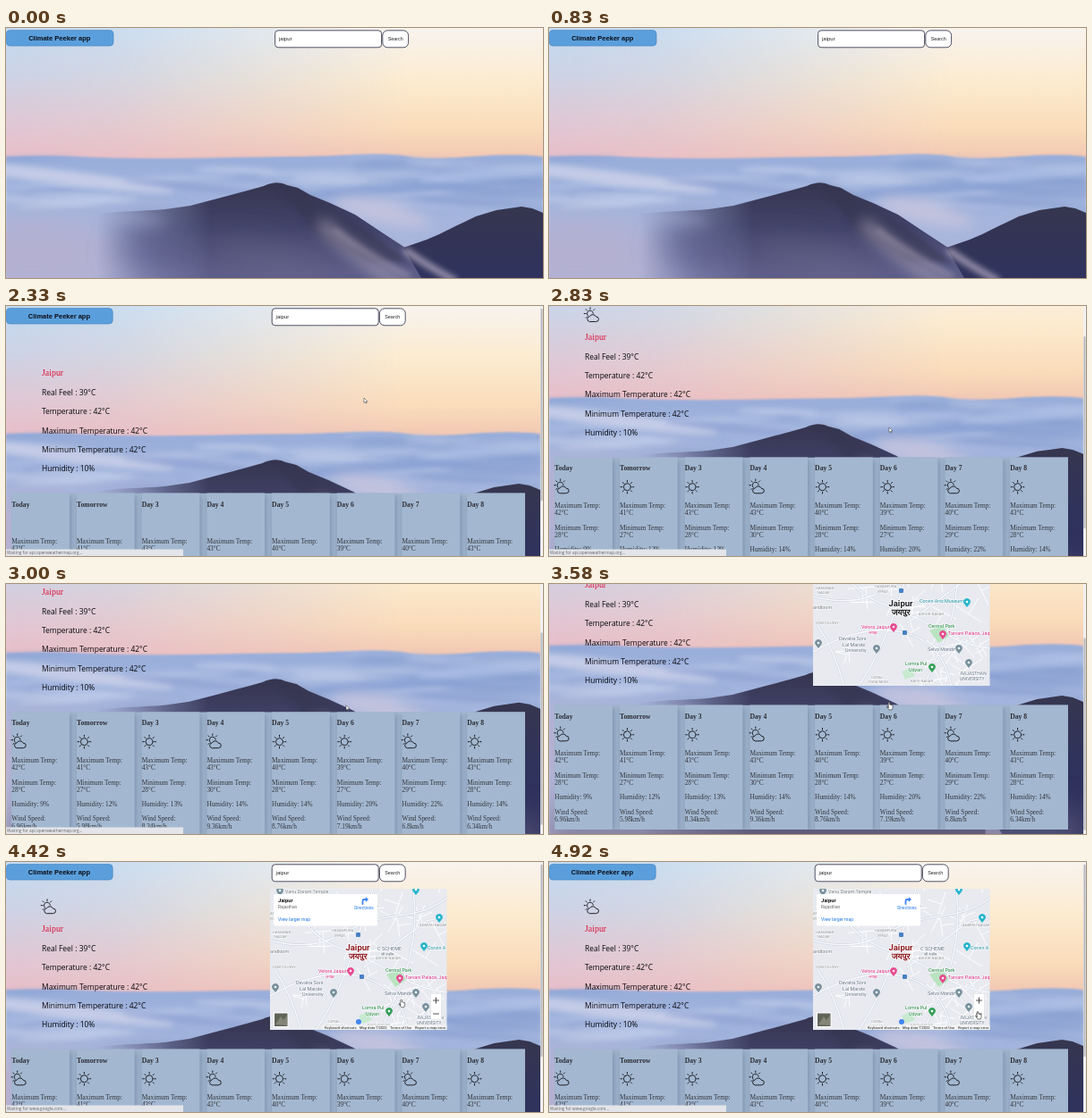
Recreate the animation shown at these times as an HTML page. Size 600 by 280 pixels, loop 5010 ms.

```html
<!DOCTYPE html>
<html lang="en">
<head>
<meta charset="utf-8">
<style>
html, body { margin: 0; width: 100%; height: 100%; overflow: hidden; background: #c8d8ea }
svg { display: block; width: 600px; height: 280px }
.arial { font-family: "Liberation Sans", sans-serif }
.serif { font-family: "Liberation Serif", serif }
.open { font-family: "Open Sans", sans-serif }
.map { font-family: Roboto, sans-serif }
.hover .button { fill: #4682b4 }
.hover .caption { fill: #fff }
</style>
</head>
<body>
<svg id="stage" viewBox="0 0 600 280"></svg>
<script>
const LOOP = 5010, STEP = 250 / 3;
const LOADED = 2080, ICONS = 2500, MAP = 3160, DETAILS = 4400;

let seed = 7;
const rnd = (a, b) => a + (b - a) * ((seed = seed * 16807 % 2147483647) / 2147483647);
const times = (n, fn) => Array.from({ length: n }, (_, i) => fn(i)).join('');
const rect = (x, y, w, h, fill, more = '') =>
  `<rect x="${x}" y="${y}" width="${w}" height="${h}" fill="${fill}" ${more}/>`;
const path = (d, fill, more = '') => `<path d="${d}" fill="${fill}" ${more}/>`;
const line = (d, color, width, more = '') =>
  path(d, 'none', `stroke="${color}" stroke-width="${width}" stroke-linecap="round" ${more}`);
const blob = (x, y, rx, ry, fill, opacity, blur, turn = 0) =>
  `<ellipse cx="${x}" cy="${y}" rx="${rx}" ry="${ry}" fill="${fill}" opacity="${opacity}"
   filter="url(#blur${blur})" transform="rotate(${turn} ${x} ${y})"/>`;
const text = (x, y, s, size, font, fill = '#222', more = '') =>
  `<text x="${x}" y="${y}" font-size="${size}" class="${font}" fill="${fill}" ${more}>${s}</text>`;
const group = (id, body, more = '') => `<g id="${id}" ${more}>${body}</g>`;
const gradient = (id, vertical, ...stops) =>
  `<linearGradient id="${id}" x2="${vertical ? 0 : 1}" y2="${vertical ? 1 : 0}">` +
  stops.map(([at, color]) => `<stop offset="${at}" stop-color="${color}"/>`).join('') + '</linearGradient>';

const BOLD = 'font-weight="bold"', MID = 'text-anchor="middle"';

function defs() {
  return '<defs>' +
    gradient('skyLeft', 1, [0, '#c3daf1'], [.35, '#cdd3e6'], [.7, '#dfc8d6'], [1, '#e9bec8']) +
    gradient('skyRight', 1, [0, '#f8f3ee'], [.4, '#fcebcf'], [.75, '#fadcba'], [1, '#f1c5b2']) +
    gradient('across', 0, [0, '#000'], [.2, '#222'], [.75, '#fff'], [1, '#fff']) +
    gradient('emerge', 0, [.17, '#000'], [.27, '#888'], [.38, '#fff']) +
    gradient('sea', 1, [0, '#98add9'], [.25, '#a3b5de'], [.55, '#adb5da'], [1, '#a9a4c2']) +
    gradient('peak', 1, [0, '#36354f'], [.25, '#41436a'], [.5, '#5c5d88'], [1, '#4c4864']) +
    gradient('ridge', 1, [0, '#36364f'], [.4, '#30335c'], [1, '#2c2e5c']) +
    [1, 3, 8, 18].map(b => `<filter id="blur${b}" x="-100%" y="-150%" width="300%" height="400%">
      <feGaussianBlur stdDeviation="${b}"/></filter>`).join('') +
    `<mask id="fade">${rect(0, 0, 600, 150, 'url(#across)')}</mask>
     <mask id="hillFade">${rect(0, 0, 600, 380, 'url(#emerge)')}</mask>
     <clipPath id="cardClip">${rect(6.3, 209.5, 573.7, 139.5, '#000')}</clipPath>
     <clipPath id="mapClip">${rect(295, 30, 197.5, 158, '#000')}</clipPath></defs>`;
}

function fog() {
  return path('M0 144Q40 142 80 144T160 146T250 145T320 144T385 142T450 144T520 144T600 144V375H0Z', 'url(#sea)', 'filter="url(#blur1)"') +
    times(40, i => blob(rnd(0, 600), 147 + i * 1.4, rnd(30, 85), rnd(1, 4), i % 2 ? '#ced8ef' : '#8099cd', .55, 3, rnd(-4, 6))) +
    blob(70, 168, 120, 8, '#cdd2ea', .8, 3, 7) + blob(210, 178, 80, 4, '#8c9dd0', .6, 3, 5) +
    blob(430, 181, 90, 6, '#869fd3', .8, 3, -4) + blob(540, 164, 80, 6, '#b7c8ea', .6, 3, -5) +
    blob(420, 206, 55, 12, '#cdc8de', .8, 8, 12) + blob(530, 190, 90, 8, '#91a4d4', .6, 8, -6) +
    blob(30, 255, 100, 42, '#b5b0d0', .9, 18) + blob(170, 250, 45, 30, '#686b9c', .75, 18, 20);
}

function landscape() {
  const hill = 'M60 214C120 203 160 206 185 202L206 199L240 190L270 182L288 177Q303 170 314 176L326 179L340 187' +
    'L362 196L390 209L420 229L446 246L470 264L490 284V375H60Z';
  return rect(0, 0, 600, 150, 'url(#skyLeft)') +
    rect(0, 0, 600, 150, 'url(#skyRight)', 'mask="url(#fade)"') + fog() +
    group('hill', path(hill, 'url(#peak)'), 'mask="url(#hillFade)"') +
    path('M303 175L322 181L362 200L412 232L450 262H400L345 230Z', '#35344f', 'opacity=".55" filter="url(#blur3)"') +
    blob(300, 262, 75, 14, '#6f698c', .6, 18, 12) +
    line('M355 222Q384 250 440 288', '#aca2b8', 15, 'opacity=".65" filter="url(#blur8)"') +
    line('M368 226Q395 248 450 278', '#c0b4c4', 4, 'opacity=".5" filter="url(#blur3)"') +
    path('M444 246L470 237L484 231L502 222L525 211L548 204L562 202L576 200L588 202L600 207V375H520Z', 'url(#ridge)') +
    line('M448 250Q470 266 500 282', '#aca3ba', 8, 'opacity=".8" filter="url(#blur3)"') +
    blob(130, 212, 50, 5, '#a9add4', .7, 8, 6) +
    rect(0, 330, 600, 60, '#6d6a8a', 'opacity=".6" filter="url(#blur18)"');
}

function header(boxWidth, field) {
  const border = 'stroke="#33344a" stroke-width=".85"';
  return rect(.4, 2.6, boxWidth, 17.4, '#5a9fdc', 'rx="4" stroke="#4a86c0" stroke-width=".7"') +
    text(boxWidth / 2, 14, 'Climate Peeker app', 7.5, 'arial', '#0c0c14', `${BOLD} ${MID}`) +
    rect(field + .6, 2.8, 119, 19, '#fff', `rx="3.5" ${border}`) +
    text(field + 5, 14.3, 'jaipur', 6, 'arial') +
    rect(field + 120.8, 2.8, 28.8, 19, '#fff', `rx="5.5" class="button" ${border}`) +
    text(field + 135.2, 14.2, 'Search', 5.4, 'arial caption', '#222', MID);
}

function weatherIcon(x, y, cloudy) {
  const c = cloudy ? 6 : 8, r = cloudy ? 3.4 : 4;
  const rays = times(8, i => {
    const cos = Math.cos(i * Math.PI / 4), sin = Math.sin(i * Math.PI / 4);
    if (cloudy && cos + sin > .5) return '';
    return `M${c + cos * (r + 1.6)} ${c + sin * (r + 1.6)}L${c + cos * (r + 3.4)} ${c + sin * (r + 3.4)}`;
  });
  const body = cloudy
    ? 'M3.4 8.5A3.5 3.5 0 1 1 9.4 5.6M5 15A2.9 2.9 0 0 1 5.4 9.3A4 4 0 0 1 12.6 9.6A2.7 2.7 0 0 1 13 15Z'
    : 'M12 8A4 4 0 1 1 4 8A4 4 0 1 1 12 8';
  return `<g transform="translate(${x} ${y})">${line(rays + body, '#17181f', .95)}</g>`;
}

const days = ['Today', 'Tomorrow', 'Day 3', 'Day 4', 'Day 5', 'Day 6', 'Day 7', 'Day 8'];
const high = [42, 41, 43, 43, 40, 39, 40, 43], low = [28, 27, 28, 30, 28, 27, 29, 28];
const damp = [9, 12, 13, 14, 14, 20, 22, 14], wind = [6.96, 5.98, 8.34, 9.36, 8.76, 7.19, 6.8, 6.34];
const cardX = i => 6.3 + 72.7 * i;

function cards() {
  const panel = rect(6.3, 209.5, 573.7, 139.5, '#a3b8d0') +
    times(8, i => rect(cardX(i) + 1, 212, 65, 139, '#4a5a80', 'opacity=".5" filter="url(#blur3)"'));
  return group('panel', panel, 'clip-path="url(#cardClip)"') +
    times(8, i => {
      const x = cardX(i);
      const rows = [[266, 'Maximum Temp:'], [274.4, high[i] + '°C'], [290.8, 'Minimum Temp:'], [299.2, low[i] + '°C'],
        [315.4, `Humidity: ${damp[i]}%`], [331.6, 'Wind Speed:'], [340, wind[i] + 'km/h']];
      return rect(x, 209.5, 64.7, 139.5, '#a3b8d0') + text(x, 224.6, days[i], 7.7, 'serif', '#2c2c34', BOLD) +
        rows.map(([y, s]) => text(x, y, s, 7.35, 'serif', '#33343c')).join('');
    });
}

function pin(x, y, color) {
  return path(`M${x} ${y + 5}L${x - 3.2} ${y + 1}A3.8 3.8 0 1 1 ${x + 3.2} ${y + 1}Z`, color) +
    `<circle cx="${x}" cy="${y - 1}" r="1.3" fill="#fff"/>`;
}

const GRAY = '#70757a', SLATE = '#5d6d7e', PINK = '#d6247a', GREEN = '#188038', TEAL = '#12899a';
const place = (x, y, s, color = GRAY, size = 5.4) =>
  text(x, y, s, size, 'map', color, 'stroke="#fff" stroke-width="1" paint-order="stroke"');
const area = (x, y, s) => place(x, y, s, '#85898f', 4.1);
const cityName = color => ['Jaipur', 'जयपुर'].map((s, i) =>
  text(393, 99 + i * 9.5, s, 9.5, 'map', color, `${MID} ${BOLD} stroke="#fff" stroke-width="1.4" paint-order="stroke"`)).join('');

function cityMap() {
  const streets = times(46, () => {
    const x = rnd(295, 492), y = rnd(30, 188), a = rnd(0, 6.3), n = rnd(12, 40);
    const dx = Math.cos(a) * n, dy = Math.sin(a) * n;
    return `M${x} ${y}l${dx} ${dy}M${x + dx / 2} ${y + dy / 2}l${-dy * .6} ${dx * .6}`;
  });
  const avenues = 'M295 88Q340 100 372 82T440 60T495 38M316 30Q330 80 372 96T440 128T495 146M295 150Q350 118 395 128' +
    'T450 190M345 190Q372 150 388 100T410 30M300 120Q320 150 330 190M400 118L470 66L495 60M455 30Q462 90 440 140T418 190';
  return rect(295, 30, 198, 158, '#e8eaf0') + line(streets, '#fff', .9) +
    line(avenues, '#c4ccda', 2.4) + line(avenues, '#f8f9fc', 1.6) +
    path('M425 126L440 120L447 132L435 140Z', '#b9e4c0') + path('M394 172l10 -4l5 9l-11 4z', '#c8ead0') +
    pin(306, 33, '#78909c') + place(312, 35, 'Vanu Daram Temple') +
    place(317, 42, 'मंदिर', GRAY, 4.6) + area(292, 59, 'HATIPURA') + area(295, 65, 'हातीपुरा') +
    area(396, 51, 'BANI PARK') + area(398, 56.5, 'बनी पार्क') + area(298, 80, 'HANUMAN') + area(300, 85, 'NAGAR') +
    area(364, 78, 'HASANPURA') + area(367, 83.5, 'हसनपुरा') + area(462, 72, 'ADARSH NAGAR') + area(413, 109, 'ASHOK NAGAR') +
    area(298, 119, 'DCM COLONY') + area(360, 180, 'GOPAL') + area(357, 185, 'PURA MODE') + area(404, 184, 'BAPU NAGAR') +
    place(295, 102, 'andloom') + rect(391, 79, 5, 5, '#4a80c4', 'rx="1"') + rect(395, 126, 5, 5, '#4a80c4', 'rx="1"') +
    place(349, 124, 'Velora Jaipur', PINK) + place(357, 129.5, 'जयपुर', PINK, 4.5) + pin(385, 123, '#e84a91') +
    place(446, 131, 'Tarvani Palace, Jaipur', PINK) + pin(440, 131, '#e84a91') + place(424, 123, 'Central Park', GREEN) +
    place(324, 137, 'Devatra Soni', SLATE) + place(328, 143.5, 'Lal Marole', SLATE) + place(331, 150, 'University', SLATE) +
    pin(366, 147, '#78909c') + pin(301, 141, '#78909c') +
    place(423, 149, 'Selva Mandir', SLATE) + pin(458, 147, '#78909c') +
    place(398, 165, 'Lomra Pul', GREEN) + place(402, 171.5, 'Udyan', GREEN) + pin(428, 168, '#34a05a') +
    pin(469, 163, '#78909c') + place(460, 176, 'RAJASTHAN', SLATE, 5) + place(459, 182, 'UNIVERSITY', SLATE, 5) +
    pin(484, 63, '#26b5cc') + pin(458, 32, '#26b5cc') + pin(467, 95, '#26b5cc') +
    group('early', place(414, 94.5, 'Corvin Arts Museum', TEAL) + cityName('#202124')) +
    group('late', place(471, 98, 'Corvin A', TEAL) + place(415, 99, 'C SCHEME', SLATE, 5.6) +
      place(419, 105, 'सी स्कीम', SLATE, 4.6) + cityName('#8f1d24') + mapControls());
}

function mapControls() {
  return rect(299, 36, 116, 35.5, '#fff', 'rx="1"') + text(304, 44.5, 'Jaipur', 5.8, 'map', '#111', BOLD) +
    text(304, 52, 'Rajasthan', 4.8, 'map', '#666') + text(304, 66, 'View larger map', 5, 'map', '#1a73e8') +
    text(400, 53.4, 'Directions', 4.8, 'map', '#1a73e8', MID) +
    line('M398.5 47V43.5Q398.5 42 400 42H402.6', '#4285f4', 1.8) + path('M401.8 39L405 42L401.8 45Z', '#4285f4') +
    rect(474.5, 147.5, 12, 29, '#fff', 'rx="1" stroke="#d5d8dc" stroke-width=".5"') +
    line('M477.5 155h6M480.5 152v6M477.5 170h6', '#555', 1.2) +
    rect(299.5, 169, 15.5, 15.5, '#5f6458', 'stroke="#fff"') + path('M301 182l6 -9l3 4l4 -5v11z', '#858577') +
    `<circle cx="394" cy="179" r="3" fill="#4285f4"/>` + rect(354, 182.4, 139, 6, '#f5f5f5', 'opacity=".85"') +
    [[356, 'Keyboard shortcuts'], [395, 'Map data ©2022'], [429, 'Terms of Use'], [457, 'Report a map error']]
      .map(([x, s]) => text(x, 187, s, 4.1, 'map', '#222')).join('');
}

function report() {
  const lines = ['Real Feel : 39°C', 'Temperature : 42°C', 'Maximum Temperature : 42°C', 'Minimum Temperature : 42°C', 'Humidity : 10%'];
  return text(40, 78, 'Jaipur', 9.9, 'serif', '#dc143c') +
    lines.map((s, i) => text(40, 100.3 + i * 21.15, s, 8.46, 'open', '#08080c')).join('') + cards();
}

const stage = document.getElementById('stage');
stage.innerHTML = defs() +
  group('page', group('scene', landscape()) + group('before', header(119.6, 300)) +
    group('after', header(118.8, 296.6) + report()) +
    group('icons', weatherIcon(40, 42.6, true) + times(8, i => weatherIcon(cardX(i) + .4, 234.8, [0, 3, 6].includes(i)))) +
    group('map', cityMap(), 'clip-path="url(#mapClip)"')) +
  group('bar', rect(597, 0, 3, 280, '#f1f1f1') + rect(597.4, 3, 2.2, 215, '#b9bbc0', 'id="thumb"')) +
  group('status', rect(0, 272.5, 198, 8, '#e3e5ea') + text(1, 278.2, '', 4.7, 'open', '#666', 'id="message"')) +
  group('arrow', path('M0 0V5.4L1.3 4.3L2.2 6.1L3 5.8L2.2 4H4Z', '#fff', 'stroke="#333" stroke-width=".5"')) +
  group('hand', path('M-.8 4V-2.2Q0 -3.2 .8 -2.2V0L4 1V4L3 6H0L-2.6 2.4L-2 1.6Z', '#fff', 'stroke="#222" stroke-width=".6"'));

const $ = id => document.getElementById(id);
const show = (id, on) => $(id).style.display = on ? '' : 'none';
const ease = p => p * p * (3 - 2 * p);

function track(t, keys) {
  const i = keys.findIndex(k => k[0] > t);
  if (i < 0) return keys.at(-1).slice(1);
  if (!i) return keys[0].slice(1);
  const [a, b] = [keys[i - 1], keys[i]], p = ease((t - a[0]) / (b[0] - a[0]));
  return a.slice(1).map((v, j) => v + (b[j + 1] - v) * p);
}

const pointer = [[1000, 468, 90], [1420, 431, 14], [1850, 431, 14], [2330, 400, 103], [2830, 380, 136],
  [3400, 380, 135], [4080, 380, 135], [4660, 479, 170]];
const scrolling = [[2508, 0], [3126, 74], [3600, 74], [3900, 0]];

function draw(now) {
  const t = Math.floor((now % LOOP + 4) / STEP) * STEP + 1;
  const loaded = t >= LOADED, hover = t > 1400 && t < 1900, pointing = hover || t > 3300;
  const [scroll] = track(t, scrolling), [x, y] = track(t, pointer);
  $('page').setAttribute('transform', `translate(0 ${-scroll})`);
  $('scene').setAttribute('transform', `scale(${loaded ? .995 : 1})`);
  $('thumb').setAttribute('y', 3 + scroll * .78);
  $('before').classList.toggle('hover', hover);
  show('before', !loaded);
  show('after', loaded);
  show('bar', loaded);
  show('icons', t >= ICONS);
  show('map', t >= MAP);
  show('early', t < DETAILS);
  show('late', t >= DETAILS);
  show('status', loaded && t < MAP || t >= DETAILS);
  $('message').textContent = `Waiting for ${t < MAP ? 'api.openweathermap.org' : 'www.google.com'}...`;
  show('arrow', t > 1000 && !pointing);
  show('hand', pointing);
  for (const id of ['arrow', 'hand']) $(id).setAttribute('transform', `translate(${x} ${y})`);
}

const start = performance.now();
(function loop() {
  draw(performance.now() - start);
  requestAnimationFrame(loop);
})();
</script>
</body>
</html>
```
